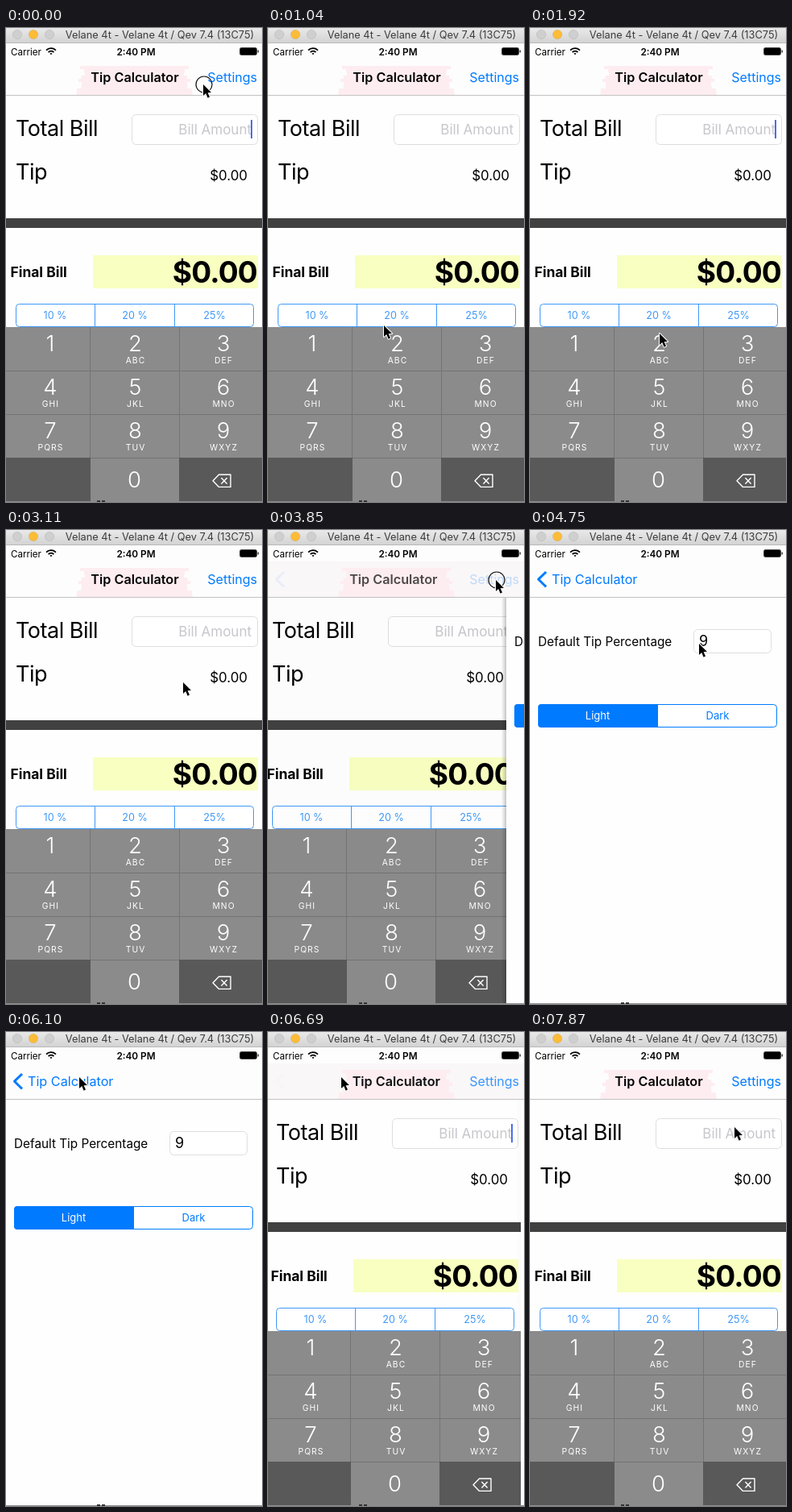
An HTML page with a canvas that plays this animation: 318 by 588 pixels, repeating every 8 s.

```html
<!DOCTYPE html>
<html lang="en">
<head>
<meta charset="utf-8">
<title>Tip Calculator</title>
<style>
html, body { margin: 0; width: 100%; height: 100%; overflow: hidden; background: #fff; }
canvas { display: block; width: 318px; height: 588px; }
</style>
</head>
<body>
<canvas id="stage" width="318" height="588"></canvas>
<script>
const ctx = document.getElementById('stage').getContext('2d');
const W = 318, H = 588, LOOP = 8000;
const NAV_BOTTOM = 84, KEYS_TOP = 371, ROW = 54;
const BLUE = '#007aff', SOFT_BLUE = '#3f98f8', PAGE = '#fefefe', KEY_LINE = '#737373';
const SANS = 'Inter, "Liberation Sans", sans-serif';

// The picture advances in even steps; all motion is a function of the step.
const STEP = 148.6, LEAD = 18;
const PUSH = 26, POP = 43;

// Where the pointer starts, then each eased move it makes.
const ORIGIN = { x: 245, y: 70 };
const MOVES = [
  { from: 0, to: 10, x: 116, y: 452 },
  { from: 10, to: 13, x: 161, y: 379 },
  { from: 13, to: 16, x: 186, y: 258 },
  { from: 19, to: 24, x: 283, y: 62 },
  { from: PUSH, to: 32, x: 210, y: 141 },
  { from: 32, to: 34, x: 232, y: 124 },
  { from: 34, to: 37, x: 226, y: 133 },
  { from: 37, to: 41, x: 91, y: 56 },
  { from: 45, to: 50, x: 246, y: 108 },
  { from: 51, to: 53, x: 254, y: 118 }
];

const clamp = v => Math.min(1, Math.max(0, v));
const ease = v => v * v * (3 - 2 * v);

function pointerAt(step) {
  return MOVES.reduce((p, m) => {
    const f = ease(clamp((step - m.from) / (m.to - m.from)));
    return { x: p.x + (m.x - p.x) * f, y: p.y + (m.y - p.y) * f };
  }, ORIGIN);
}

// Critically damped slide, sampled n steps after it begins.
function slide(n) {
  if (n < 0) return 0;
  const u = 0.43 + 3 * n;
  return n > 3 ? 1 : 1 - (1 + u) * Math.exp(-u);
}

// The blink restarts when the field regains focus.
function caretOn(step) {
  const phase = step < POP ? step + 3.17 : step - POP + 1;
  return Math.floor(phase / 3.36) % 2 === 0;
}

function rect(x, y, w, h, fill) {
  ctx.fillStyle = fill;
  ctx.fillRect(x, y, w, h);
}

function box(x, y, w, h, r, stroke, fill) {
  ctx.beginPath();
  ctx.roundRect(x + 0.5, y + 0.5, w - 1, h - 1, r);
  ctx.fillStyle = fill;
  ctx.fill();
  ctx.strokeStyle = stroke;
  ctx.lineWidth = 1;
  ctx.stroke();
}

function text(str, x, y, size, color, { align = 'left', weight = 400, track = 0 } = {}) {
  ctx.font = `${weight} ${size}px ${SANS}`;
  ctx.letterSpacing = track + 'px';
  ctx.textAlign = align;
  ctx.fillStyle = color;
  ctx.fillText(str, x, y);
}

function polyline(points, close) {
  ctx.beginPath();
  points.forEach(([x, y]) => ctx.lineTo(x, y));
  if (close) ctx.closePath();
}

function stroke(color, width) {
  ctx.strokeStyle = color;
  ctx.lineWidth = width;
  ctx.lineJoin = 'round';
  ctx.stroke();
}

function withAlpha(alpha, draw) {
  ctx.save();
  ctx.globalAlpha = alpha;
  draw();
  ctx.restore();
}

function shifted(x, y, draw) {
  ctx.save();
  ctx.translate(x, y);
  draw();
  ctx.restore();
}

function titleBar() {
  const g = ctx.createLinearGradient(0, 0, 0, 19);
  g.addColorStop(0, '#e9e9e9');
  g.addColorStop(1, '#d2d2d2');
  rect(0, 0, W, 19, g);
  rect(0, 18, W, 1, '#b9b9b9');
  ['#cfcfcf', '#fdbc38', '#cfcfcf'].forEach((fill, i) => {
    ctx.beginPath();
    ctx.arc(14 + 20 * i, 8, 5.7, 0, 7);
    ctx.fillStyle = fill;
    ctx.fill();
    stroke('rgba(0,0,0,.1)', 0.8);
  });
  text('Velane 4t - Velane 4t / Qev 7.4 (13C75)', 191, 13, 12.8, '#3c3c3c', { align: 'center' });
}

function statusBar() {
  text('Carrier', 6, 33.5, 11.6, '#000');
  for (const r of [1.2, 4.6, 8.2]) {
    ctx.beginPath();
    ctx.arc(56, 33.3, r, -Math.PI * 0.76, -Math.PI * 0.24);
    stroke('#000', 1.8);
  }
  text('2:40 PM', 161.5, 33.5, 11.8, '#000', { align: 'center', weight: 600 });
  box(290, 24, 22, 10, 2, '#444', '#000');
  rect(312.5, 27.5, 1.5, 3, '#444');
}

// Ragged pink tint behind the title.
function titleTint() {
  for (let i = 0; i < 9; i++) {
    const inset = 8 * Math.abs(Math.sin(i * 2.3)) + (8 - i);
    rect(84 + inset, 47 + 4 * i, 151 - 2 * inset, 4, '#fdedf1');
  }
}

// q is 0 on the calculator and 1 on the settings page.
function navBar(q) {
  rect(0, 19, W, 64, '#fdfdfd');
  if (q > 0 && q < 1) rect(0, 39, W, 44, '#faf7f8');
  withAlpha(1 - q, titleTint);
  rect(0, NAV_BOTTOM - 1, W, 1, '#c2c2c4');
  statusBar();
  withAlpha((1 - q) ** 5, () =>
    text('Tip Calculator', 160 - 60 * q, 67, 16.2, '#000', { align: 'center', weight: 600 }));
  withAlpha((1 - q) ** 20, () =>
    text('Settings', 312, 67, 16, BLUE, { align: 'right' }));
  withAlpha(q * q, () => text('Tip Calculator', 27 + 78 * (1 - q), 67, 16.2, BLUE));
  withAlpha(q, () => {
    polyline([[20, 52], [10.5, 61.2], [20, 70.5]]);
    stroke(BLUE, 3);
  });
}

function keypad() {
  const columns = [55, 160.5, 270];
  const letters = ['', 'ABC', 'DEF', 'GHI', 'JKL', 'MNO', 'PQRS', 'TUV', 'WXYZ'];
  const digit = { align: 'center', weight: 300 };
  rect(0, KEYS_TOP, W, H - KEYS_TOP, '#8b8b8b');
  for (let i = 1; i < 4; i++) rect(0, KEYS_TOP + ROW * i, W, 1, KEY_LINE);
  for (const x of [104, 215]) rect(x, KEYS_TOP, 1, 3 * ROW, KEY_LINE);
  for (const x of [0, 215]) rect(x, KEYS_TOP + 3 * ROW, 105, ROW + 1, '#595959');
  letters.forEach((label, i) => {
    const x = columns[i % 3], y = KEYS_TOP + 30 + ROW * Math.floor(i / 3);
    text(i + 1, x, y, 27.5, '#fff', digit);
    text(label, x + 0.5, y + 15, 10.3, '#fff', { align: 'center', track: 1.1 });
  });
  text('0', 159.5, 570, 27.5, '#fff', digit);
  shifted(271, 561.7, () => {
    polyline([[-14, 0], [-6.5, -7.7], [8, -7.7], [8, 7.7], [-6.5, 7.7]], true);
    stroke('#fff', 1.4);
    for (const s of [1, -1]) {
      polyline([[-3.6, -3.8 * s], [3.6, 3.8 * s]]);
      stroke('#fff', 1.4);
    }
  });
}

function calculator(caret) {
  rect(0, NAV_BOTTOM, W + 100, H, PAGE);
  text('Total Bill', 12, 134, 27, '#000', { track: -0.5 });
  text('Tip', 12, 188, 27, '#000', { track: -0.5 });
  box(156, 107, 157, 38, 5, '#dedede', '#fff');
  text('Bill Amount', 305, 132, 17, '#c7c7cc', { align: 'right' });
  if (caret) rect(304, 114, 2, 23, '#4a6cf0');
  text('$0.00', 300, 189, 16.9, '#000', { align: 'right' });
  rect(0, 236, W + 100, 12, '#414141');
  text('Final Bill', 5.5, 309, 17.4, '#000', { weight: 700 });
  rect(108, 282, 205, 41, '#f8ffc0');
  text('$0.00', 312, 316, 37, '#000', { align: 'right', weight: 700, track: -0.8 });
  box(12, 342, 296, 29, 4, SOFT_BLUE, '#fff');
  ['10 %', '20 %', '25%'].forEach((label, i) => {
    if (i) rect(11 + 99 * i, 342, 1, 29, SOFT_BLUE);
    text(label, 61 + 99 * i, 361, 12.6, SOFT_BLUE, { align: 'center' });
  });
  keypad();
}

function settings() {
  rect(0, NAV_BOTTOM, W, H, PAGE);
  text('Default Tip Percentage', 10, 144, 15.3, '#000');
  box(203, 123, 97, 30, 5, '#dedede', '#fff');
  text('9', 210, 144, 18, '#000');
  box(10, 216, 297, 29, 4, BLUE, '#fff');
  ctx.beginPath();
  ctx.roundRect(10, 216, 149, 29, [4, 0, 0, 4]);
  ctx.fillStyle = BLUE;
  ctx.fill();
  text('Light', 84, 235, 13, '#fff', { align: 'center' });
  text('Dark', 233, 235, 13, BLUE, { align: 'center' });
}

function pages(q, caret) {
  const edge = Math.round(W * (1 - q));
  shifted(-Math.ceil(95 * q), 0, () => calculator(caret));
  if (q === 0) return;
  rect(0, NAV_BOTTOM, W, H, `rgba(0,0,0,${0.1 * q})`);
  const g = ctx.createLinearGradient(edge - 6, 0, edge, 0);
  g.addColorStop(0, 'rgba(0,0,0,0)');
  g.addColorStop(1, `rgba(0,0,0,${0.22 * ease(clamp(14 * q))})`);
  rect(edge - 6, NAV_BOTTOM, 6, H, g);
  shifted(edge, 0, settings);
}

function pointer({ x, y }, ring) {
  shifted(Math.round(x), Math.round(y), () => {
    if (ring) {
      ctx.beginPath();
      ctx.arc(1, 0, 10, 0, 7);
      stroke('#111', 1.2);
    }
    polyline([[0, 0], [0, 14], [3.2, 11.1], [5.6, 16.7], [8, 15.6], [5.6, 10.3], [10, 10]], true);
    stroke('#fff', 2);
    ctx.fillStyle = '#000';
    ctx.fill();
  });
}

function render(time) {
  const step = Math.floor((time % LOOP + LEAD) / STEP);
  const q = slide(step - PUSH) - slide(step - POP);
  pages(q, caretOn(step));
  navBar(q);
  titleBar();
  rect(0, H - 1, W, 1, '#8e8e8e');
  for (const x of [113, 119]) rect(x, H - 2, 4, 2, '#333');
  pointer(pointerAt(step), [0, PUSH, POP].includes(step));
}

const start = performance.now();
function tick() {
  render(performance.now() - start);
  requestAnimationFrame(tick);
}
tick();
</script>
</body>
</html>
```
